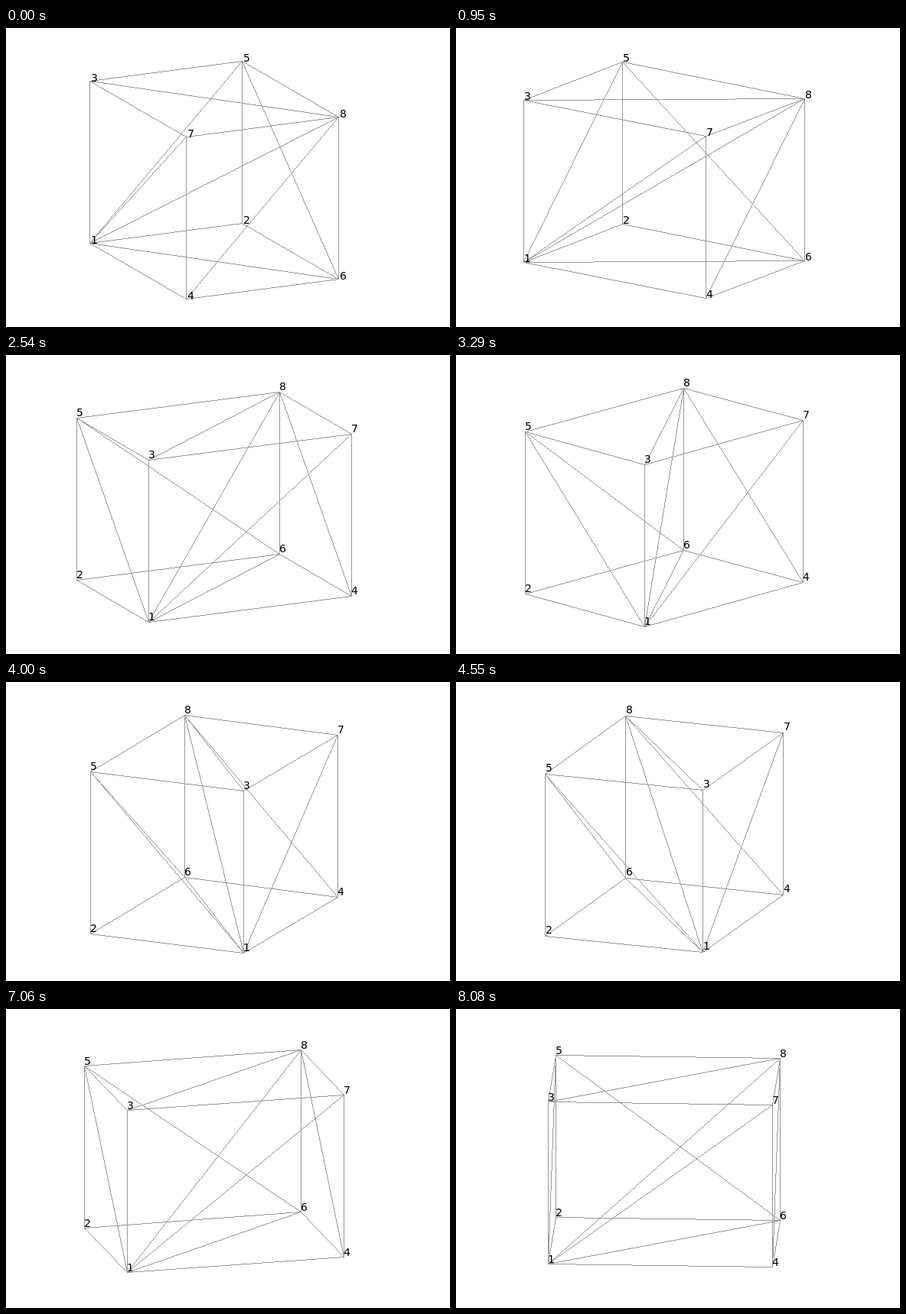
These frames come from a looping animation (580 px wide and 391 px high, 9260 ms). An HTML page with a canvas:

```html
<!DOCTYPE html>
<html lang="en">
<head>
<meta charset="utf-8">
<title>Rotating box</title>
<style>
  html, body { margin: 0; width: 100%; height: 100%; overflow: hidden; background: #fff; }
  canvas { display: block; }
</style>
</head>
<body>
<canvas id="stage" width="580" height="391"></canvas>
<script>
const ctx = document.getElementById('stage').getContext('2d');
const LOOP = 9260;
const CENTER = { x: 272, y: 199.2 };
const HALF = { length: 146.65, width: 110, height: 106 };
const TILT = 0.2758;

// A corner's index holds its sides in bits: 1 length, 2 width, 4 top
const NAMES = [...'14263758'];
const sign = (index, bit) => index & bit ? 1 : -1;

// Box edges, every line from the first corner, and three face diagonals
const isBoxEdge = (i, j) => [1, 2, 4].includes(i ^ j);
const isDiagonal = (i, j) => ['38', '48', '65'].includes(NAMES[i] + NAMES[j]);
const edges = [];
for (let i = 0; i < 8; i++) {
  for (let j = i + 1; j < 8; j++) {
    if (i === 0 || isBoxEdge(i, j) || isDiagonal(i, j)) edges.push([i, j]);
  }
}

// Turn of the first drag: [step, degrees]
const turn = [[0, 63.7], [21, 23], [34, 5.5], [52, -25.2], [65, -40], [86, -65.3], [99, -69.1]];

// Monotone cubic through the points, at rest at both ends
function curve(points, n) {
  const last = points.length - 1;
  if (n >= points[last][0]) return points[last][1];
  const rate = i => (points[i + 1][1] - points[i][1]) / (points[i + 1][0] - points[i][0]);
  const slope = i => {
    if (i === 0 || i === last) return 0;
    const a = rate(i - 1), b = rate(i);
    return a * b > 0 ? 2 * a * b / (a + b) : 0;
  };
  const i = points.findIndex((point, k) => n < points[k + 1][0]);
  const [n0, from] = points[i], [n1, to] = points[i + 1];
  const span = n1 - n0, s = (n - n0) / span, s2 = s * s, s3 = s2 * s;
  return from + (to - from) * (3 * s2 - 2 * s3)
    + span * (slope(i) * (s3 - 2 * s2 + s) + slope(i + 1) * (s3 - s2));
}

const stepAt = (t, start, length) => Math.floor((t - start) / length) + 1;

function angleAt(t) {
  if (t < 100) return 64.5;
  if (t < 310) return 63.7;
  if (t < 5870) return curve(turn, stepAt(t, 310, 43.25));
  if (t < 5920) return -74.6;
  if (t < 6320) return -76;
  const progress = Math.min(stepAt(t, 6320, 45.1) / 40, 1);
  return 2.8 - 78.8 * (1 - progress) ** 2.7;
}

// One-pixel line without smoothing
function line(a, b) {
  const dx = b.x - a.x, dy = b.y - a.y;
  const steps = Math.max(Math.abs(dx), Math.abs(dy), 1);
  for (let i = 0; i <= steps; i++) {
    ctx.fillRect(Math.round(a.x + dx * i / steps), Math.round(a.y + dy * i / steps), 1, 1);
  }
}

function draw(t) {
  const angle = angleAt(t) * Math.PI / 180;
  const cos = Math.cos(angle), sin = Math.sin(angle);
  const points = NAMES.map((name, i) => {
    const u = sign(i, 1) * HALF.length, v = sign(i, 2) * HALF.width;
    return {
      x: Math.floor(CENTER.x + u * cos + v * sin),
      y: Math.floor(CENTER.y - sign(i, 4) * HALF.height + TILT * (u * sin - v * cos))
    };
  });

  ctx.fillStyle = '#fff';
  ctx.fillRect(0, 0, 580, 391);
  ctx.fillStyle = '#999';
  for (const [i, j] of edges) line(points[i], points[j]);

  // Labels drift slightly around their corners as the box turns
  const shiftX = 2 - 2 * cos + 0.8 * sin;
  const shiftY = -0.9 + 1.75 * sin;
  ctx.fillStyle = '#000';
  ctx.font = '14px "DejaVu Sans", sans-serif';
  points.forEach((p, i) => {
    ctx.fillText(NAMES[i], Math.round(p.x + shiftX), Math.round(p.y + shiftY));
  });
}

const begin = performance.now();
function tick() {
  draw((performance.now() - begin) % LOOP);
  requestAnimationFrame(tick);
}
tick();
</script>
</body>
</html>
```
